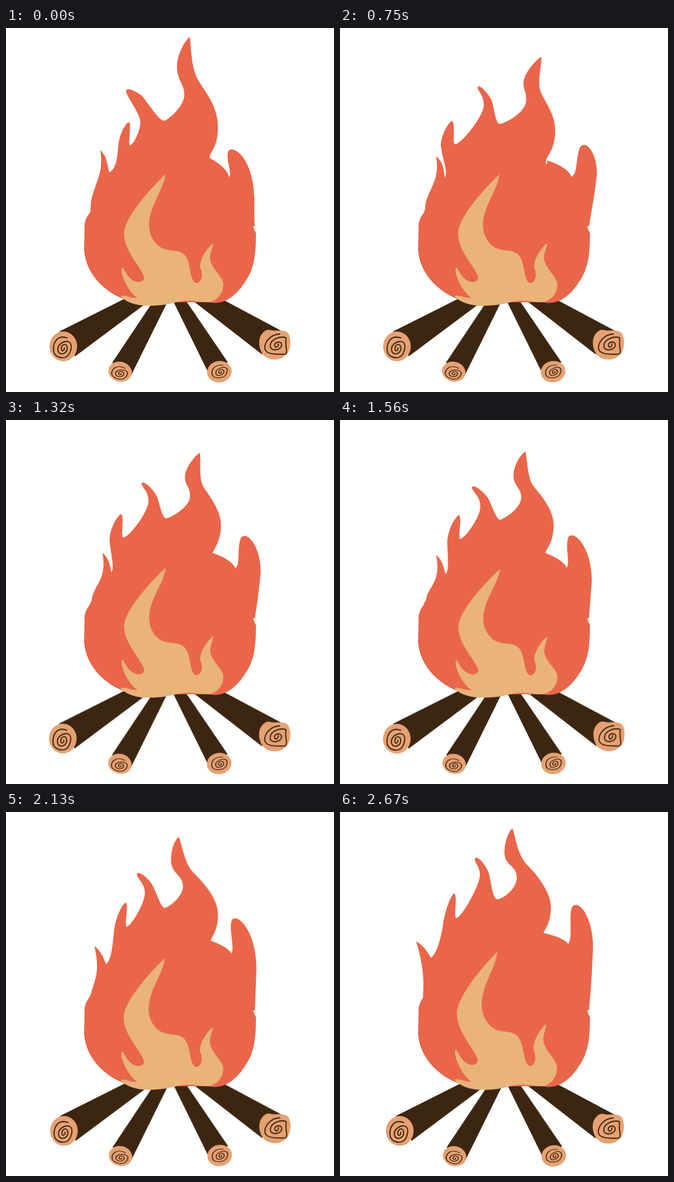
Recreate the animation shown at these times as an HTML page without scripts. Size 664 px wide and 734 px high, loop 2.7 s.

```html
<!DOCTYPE html>
<html lang="en">
<head>
<meta charset="utf-8">
<title>Campfire</title>
<style>
html, body { margin: 0; width: 100%; height: 100%; overflow: hidden; background: #fff; }
svg { display: block; width: 664px; height: 734px; }

.flame { fill: #e9664a; }
.core { fill: #e9b379; }
.wood { fill: #3d2611; }
.cut { fill: #e6a172; }
.rings { fill: none; stroke: #3d2611; stroke-width: 2.3; stroke-linecap: round; stroke-linejoin: round; }
.rings, .rings path { vector-effect: non-scaling-stroke; }

.tongue, .core, .log { animation: 2.7s linear infinite; }
.edge { animation-name: edge; }
.low { animation-name: low; }
.mid { animation-name: mid; }
.top { animation-name: top, lean; transform-origin: 0 200px; }
.side { animation-name: side; }
.core { animation-name: breathe; transform-origin: 330px 555px; }
.log { animation-name: sway; }

@keyframes edge {
  0% { d: path("M172 350C182 305 198 295 191 246C204 260 204 270 209 291L235 315V385H170Z"); }
  38.9% { d: path("M174 354C184 322 204 310 196 263C210 276 211 284 213 303L235 315V385H170Z"); }
  66.7% { d: path("M176 357C186 334 204 328 194 276C206 288 207 296 214 314L235 325V385H170Z"); }
  98.9%, to { d: path("M168 372C170 345 170 310 154 261C168 268 176 280 184 294L235 315V385H170Z"); }
}
@keyframes low {
  0% { d: path("M209 291C224 285 226 255 227 240C230 210 244 190 249 190C254 192 248 225 250 236L280 270V330H205Z"); animation-timing-function: ease-out; }
  38.9% { d: path("M213 303C219 292 204 262 201 236C202 212 218 190 223 187C232 192 225 222 229 233L280 270V330H212Z"); }
  66.7% { d: path("M214 314C224 308 223 274 225 248C228 218 242 198 249 194C255 198 246 232 249 242L280 270V330H212Z"); }
  98.9%, to { d: path("M184 294C197 285 205 250 208 230C212 200 224 168 231 164C239 168 230 206 235 214L280 270V330H190Z"); }
}
@keyframes mid {
  0% { d: path("M250 236C256 240 272 208 272 190S243 138 243 127C244 118 264 128 273 135S308 186 319 187V270H270Z"); animation-timing-function: cubic-bezier(.3, .5, .6, .95); }
  38.9% { d: path("M229 233C238 242 290 178 293 155S282 126 283 118C287 112 304 132 310 145S314 194 325 195V270H260Z"); }
  66.7% { d: path("M249 242C255 245 281 206 280 184S260 154 260 144C263 136 282 150 291 158S316 204 323 204V270H270Z"); }
  98.9%, to { d: path("M235 214C247 213 281 150 283 130S272 104 273 94C278 86 296 108 301 123S308 176 319 176V270H260Z"); }
}
@keyframes top {
  0% { d: path("M319 187C328 187 360 158 361 136S346 105 346 78S365 22 372 18C375 36 374 80 389 105S429 158 429 200S413 248 412 262V310H300Z"); animation-timing-function: cubic-bezier(.33, .4, .67, .8); }
  38.9% { d: path("M325 195C334 195 378 174 379 152S375 134 375 118S402 74 412 69C413 88 401 120 410 139S439 184 438 214S426 258 421 268V310H300Z"); }
  66.7% { d: path("M323 204C330 203 361 180 361 159S340 134 340 110S350 66 358 61C364 76 368 116 384 132S431 180 430 214S417 256 413 268V310H300Z"); }
  98.9%, to { d: path("M319 176C328 176 358 156 358 132S333 108 333 82S344 36 349 33C356 50 358 86 380 108S428 164 427 194S416 234 412 244V310H300Z"); }
}
@keyframes lean {
  0%, 38.9%, 66.7%, 98.9%, to { transform: skewX(0deg); }
  20% { transform: skewX(-3deg); }
  80% { transform: skewX(2deg); }
}
@keyframes side {
  0% { d: path("M412 262Q446 280 452 301C458 290 444 266 450 248C460 236 500 260 503 345Q502 385 504 400H390Z"); animation-timing-function: cubic-bezier(.3, .5, .6, .95); }
  38.9% { d: path("M421 268Q461 280 471 300C484 294 481 262 490 240C502 222 524 252 522 290Q517 330 504 400H390Z"); }
  66.7% { d: path("M413 268Q446 282 453 297C459 286 442 252 450 233C464 222 503 264 504 340Q502 380 504 400H390Z"); }
  98.9%, to { d: path("M412 244Q450 252 462 266C472 254 462 206 470 191C484 174 514 216 512 275Q510 340 504 400H390Z"); }
}
@keyframes breathe {
  0%, 38.9% { transform: skewX(0deg) scaleY(1); }
  66.7% { transform: skewX(-.3deg) scaleY(.969); }
  78.9% { transform: skewX(.3deg) scaleY(1); }
  98.9%, to { transform: skewX(.9deg) scaleY(1.052); }
}
@keyframes sway {
  0% { transform: none; }
  38.9% { transform: translateX(-1px); }
  66.7% { transform: var(--late); }
  98.9%, to { transform: var(--end); }
}
</style>
</head>
<body>
<svg viewBox="0 0 664 734">
  <defs>
    <path id="spiral" d="M9 -18C-11 -25 -19 -9 -19 5S-5 24 5 21S21 -3 14 -9S-11 -7 -10 6S9 15 9 3S-3 -6 -3 3S4 7 3 2"/>
  </defs>
  <g class="log" style="--late: translate(-1px, 1px); --end: translate(5px, 1px)">
    <path class="wood" d="M108 612L246 543H300L140 662Z"/>
    <ellipse class="cut" cx="116" cy="642" rx="28" ry="30"/>
    <use class="rings" href="#spiral" x="115" y="643"/>
  </g>
  <g class="log" style="--late: translate(.5px, .5px); --end: translate(1px, 1px)">
    <path class="wood" d="M215 675L300 548H329L254 699Z"/>
    <ellipse class="cut" cx="231" cy="693" rx="24" ry="20" transform="rotate(14 231 693)"/>
    <g class="rings" transform="translate(231 695) rotate(12) scale(.88 .6)"><use href="#spiral"/></g>
  </g>
  <g class="log" style="--late: translate(.5px, -.8px); --end: translate(.7px, .5px)">
    <path class="wood" d="M408 692L337 548H363L449 674Z"/>
    <ellipse class="cut" cx="432" cy="693" rx="25" ry="21.5" transform="rotate(-10 432 693)"/>
    <g class="rings" transform="translate(433 692) rotate(-10) scale(.88 .6)"><use href="#spiral"/></g>
  </g>
  <g class="log" style="--late: translate(1px, -1px); --end: translate(-1px, 0)">
    <path class="wood" d="M518 658L372 545H434L562 613Z"/>
    <path class="cut" d="M540 610C552 611 568 607 573 619S577 652 564 662S532 670 522 660S509 628 518 617S532 609 540 610Z"/>
    <path class="rings" d="M554 617C535 618 523 634 524 646S545 658 560 658S564 648 567 625C560 620 536 626 535 640S557 650 558 640S543 632 544 640S553 641 551 637"/>
  </g>
  <g class="flame">
    <path d="M159 408C158 380 168 380 172 366L186 352L216 318L252 246L325 207L413 271L452 304L500 400L506 414C506 468 500 490 480 518S436 559 410 553H300L242 548C205 535 162 500 158 448Z"/>
    <path class="tongue edge"/>
    <path class="tongue low"/>
    <path class="tongue mid"/>
    <path class="tongue side"/>
    <path class="tongue top"/>
  </g>
  <path class="core" d="M323 295C300 316 239 380 239 415S274 482 280 503C278 515 263 515 252 505S240 485 235 483C229 494 248 533 266 544C254 546 237 536 232 541C240 551 262 560 285 560S322 559 345 553S385 552 405 553S440 536 440 518S414 486 413 463C414 450 420 440 419 434C404 447 392 468 393 483C399 495 397 513 386 514C371 514 376 474 362 458S322 456 303 434S288 386 297 362S320 318 323 295Z"/>
</svg>
</body>
</html>
```
